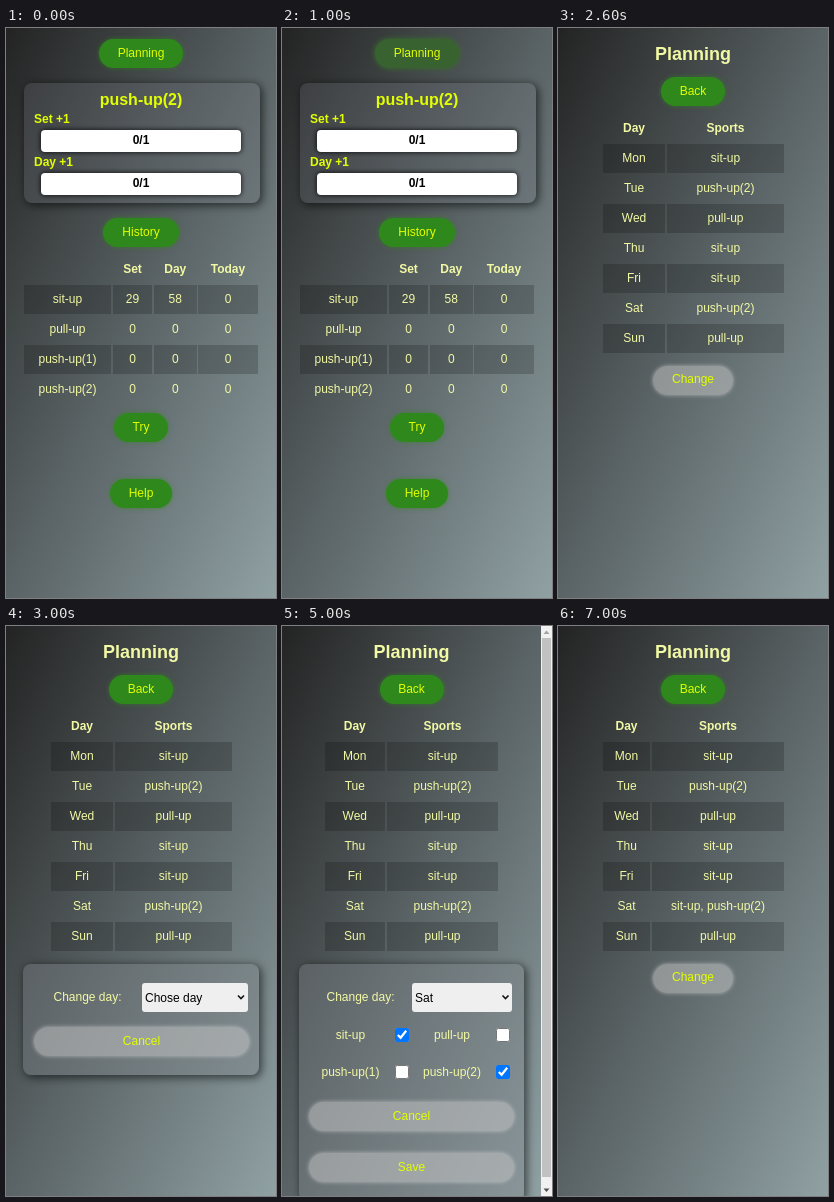
Recreate the animation shown at these times as an HTML page. Size 270 by 570 pixels, loop 8000 ms.

```html
<!DOCTYPE html>
<html lang="en">
<head>
<meta charset="utf-8">
<style>
html, body { margin: 0; width: 100%; height: 100%; overflow: hidden; }
body { position: relative; background: #232323; font: 12px "Liberation Sans", Arial, sans-serif; color: #f2f9a4; }
div, input, svg { position: absolute; box-sizing: border-box; margin: 0; }
.scene { left: 0; top: 0; width: 270px; height: 570px; overflow: hidden; visibility: hidden; }
.bg { left: 0; top: 0; background: linear-gradient(to bottom right, #232323, #5a6365 50%, #90a1a4); }
.text { white-space: pre; text-align: center; }
.green, .hover, .gray { border-radius: 15px; }
.green { background: #2f881c; box-shadow: 0 0 5px rgba(47, 136, 28, .6); }
.hover { background: #38622f; box-shadow: 0 0 5px 1px rgba(56, 110, 45, .8); }
.gray { background: rgba(200, 200, 200, .5); box-shadow: 0 0 4px rgba(225, 225, 225, .6); }
.card { border-radius: 8px; background: rgba(125, 130, 135, .22); box-shadow: 2px 2px 8px 1px rgba(0, 0, 0, .55); }
.form { background: rgba(130, 136, 140, .34); }
.cell { background: rgba(0, 0, 0, .19); }
.bar { background: #fff; border-radius: 4px; box-shadow: 0 0 4px 1px rgba(0, 0, 0, .65); }
.select { background: #efefef; border-radius: 3px; }
.focus { box-shadow: inset 0 0 0 2px #101010, 0 0 0 1px #fff; }
.track { background: #f1f1f1; }
.thumb { background: #c1c1c1; }
input { pointer-events: none; }
</style>
</head>
<body>
<script>
const YELLOW = '#e1ff00', PALE = '#f2f9a4';

const box = (cls, x, y, w, h) =>
  `<div class="${cls}" style="left:${x}px;top:${y}px;width:${w}px;height:${h}px"></div>`;

// Text centred on (x, y), or starting at x when align is "left".
function text(s, x, y, { size = 12, bold = false, color = PALE, align = 'center' } = {}) {
  const line = Math.round(size * 1.15);
  const left = align === 'left' ? x : x - 120;
  return `<div class="text" style="left:${left}px;top:${y - line / 2}px;width:240px;text-align:${align};` +
    `font-size:${size}px;line-height:${line}px;font-weight:${bold ? 700 : 400};color:${color}">${s}</div>`;
}

const path = (d, style) =>
  `<svg width="270" height="570" style="left:0;top:0"><path d="${d}" ${style}/></svg>`;

const pill = (cls, label, x, y, w, h = 28.5) =>
  box(cls, x, y, w, h) + text(label, x + w / 2, Math.floor(y) + 14, { color: YELLOW });

// cols: [left, width] pairs; every other body row is shaded.
function table(cols, y, head, rows) {
  const row = (cells, cy, bold) =>
    cells.map((s, i) => text(s, cols[i][0] + cols[i][1] / 2, cy, { bold })).join('');
  return row(head, y, true) + rows.map((cells, r) => {
    const cy = y + 30 * (r + 1);
    const shade = r % 2 ? '' : cols.map(([x, w]) => box('cell', x, cy - 14, w, 29)).join('');
    return shade + row(cells, cy, false);
  }).join('');
}

function select(label, x, w, focus) {
  const c = x + w - 6.5;
  return box('select' + (focus ? ' focus' : ''), x, focus ? 356 : 357, w, focus ? 30 : 28.5) +
    text(label, x + 3, 372, { color: '#000', align: 'left' }) +
    path(`M${c - 3} 369.5l3 3l3-3`, 'fill="none" stroke="#111" stroke-width="1.6"');
}

const check = (label, x, y, boxX, on) => text(label, x, y, {}) +
  `<input type="checkbox" tabindex="-1" ${on ? 'checked' : ''} style="left:${boxX}px;top:${y - 7}px;width:14px;height:14px">`;

function home(hover) {
  const bar = (label, y) =>
    text(label, 28, y, { bold: true, color: YELLOW, align: 'left' }) +
    box('bar', 35, y + 10.5, 200, 22.5) +
    text('0/1', 135, y + 21, { bold: true, color: '#000' });
  return box('bg', 0, 0, 270, 570) +
    pill(hover ? 'hover' : 'green', 'Planning', 93, 11, 84) +
    box('card', 18, 55, 235.5, 120) +
    text('push-up(2)', 135, 72, { size: 16, bold: true, color: YELLOW }) +
    bar('Set +1', 91) + bar('Day +1', 134) +
    pill('green', 'History', 97, 190, 76) +
    table([[18, 87], [107, 39], [148, 42.5], [192, 60]], 241, ['', 'Set', 'Day', 'Today'], [
      ['sit-up', 29, 58, 0], ['pull-up', 0, 0, 0], ['push-up(1)', 0, 0, 0], ['push-up(2)', 0, 0, 0]]) +
    pill('green', 'Try', 108, 385, 54) +
    pill('green', 'Help', 104, 451, 62);
}

function planning(mid, cols, sat = 'push-up(2)') {
  const days = ['Mon', 'Tue', 'Wed', 'Thu', 'Fri', 'Sat', 'Sun'];
  const sports = ['sit-up', 'push-up(2)', 'pull-up', 'sit-up', 'sit-up', sat, 'pull-up'];
  return box('bg', 0, 0, mid * 2, mid < 135 ? 577 : 570) +
    text('Planning', mid, 26, { size: 18, bold: true }) +
    pill('green', 'Back', mid - 32, 49, 64) +
    table(cols, 100, ['Day', 'Sports'], days.map((d, i) => [d, sports[i]]));
}

const WIDE = [[45, 62], [109, 117]];
const changeButton = pill('gray', 'Change', 95, 337.5, 80, 29);

const chooser = planning(135, WIDE) +
  box('card form', 17, 337.5, 236, 111) +
  text('Change day:', 81.5, 371) +
  select('Chose day', 136, 105.5) +
  pill('gray', 'Cancel', 28, 401, 215, 29);

const editor = sitUp => planning(129.5, [[42.5, 60.5], [105, 111]]) +
  box('card form', 16.5, 337.5, 225.5, 237) +
  text('Change day:', 78.5, 371) +
  select('Sat', 130, sitUp ? 100 : 101, !sitUp) +
  check('sit-up', 68.5, 409, 113, sitUp) +
  check('pull-up', 170, 409, 214, false) +
  check('push-up(1)', 68.5, 446, 113, false) +
  check('push-up(2)', 170, 446, 214, true) +
  pill('gray', 'Cancel', 27, 476, 205, 29) +
  pill('gray', 'Save', 27, 527, 205, 29) +
  box('track', 259, 0, 11, 570) +
  box('thumb', 260, 12, 9, 539) +
  path('M261.5 8l3-3.5l3 3.5z', 'fill="#a3a3a3"') +
  path('M261.5 562.5l3 3.5l3-3.5z', 'fill="#505050"');

// [start in ms, markup]
const scenes = [
  [0, home(false)],
  [1000, home(true)],
  [2000, planning(135, WIDE) + changeButton],
  [3000, chooser],
  [4000, editor(false)],
  [5000, editor(true)],
  [7000, planning(135, [[45, 47], [94, 132]], 'sit-up, push-up(2)') + changeButton],
];
document.body.innerHTML = scenes.map(([, html]) => `<div class="scene">${html}</div>`).join('');
const layers = [...document.body.children];

const start = performance.now();
function draw(now) {
  const t = Math.max(0, now - start) % 8000;
  const current = scenes.findLastIndex(([at]) => t >= at);
  layers.forEach((el, i) => el.style.visibility = i === current ? 'visible' : 'hidden');
  requestAnimationFrame(draw);
}
draw(start);
</script>
</body>
</html>
```
